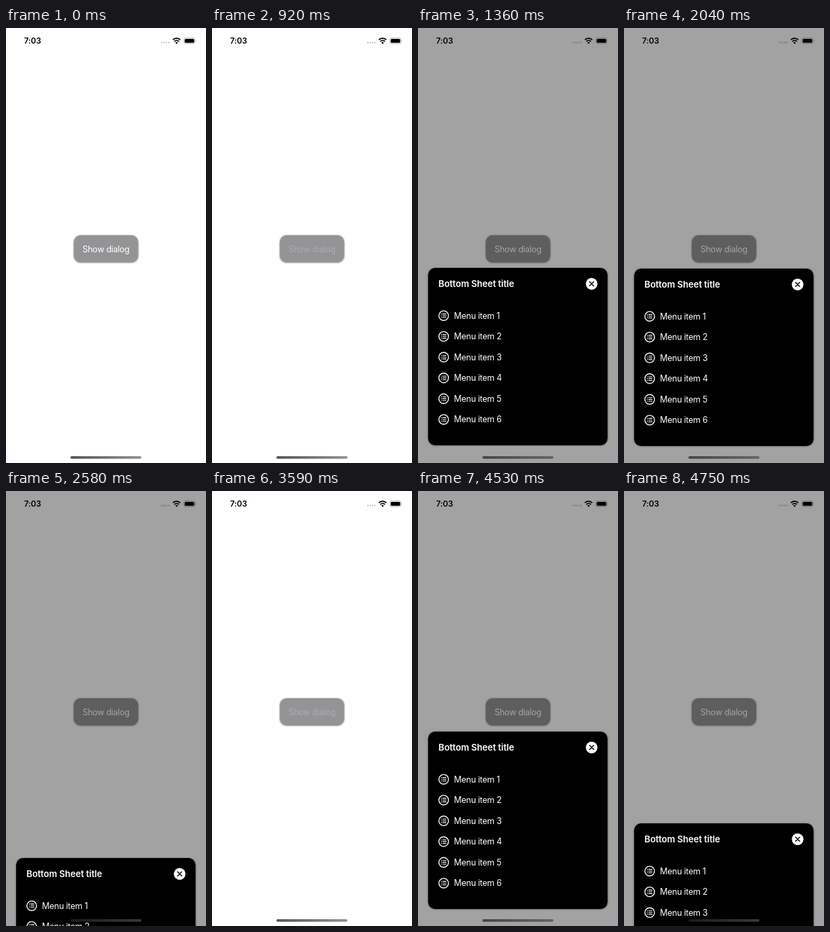
Write an HTML page that moves like this. It is 296 px wide and 640 px high and loops after 4810 ms.

```html
<!DOCTYPE html>
<html lang="en">
<head>
<meta charset="utf-8">
<title>Bottom sheet</title>
<style>
  html, body { margin: 0; width: 100%; height: 100%; overflow: hidden; background: #fff; }
  svg { display: block; width: 296px; height: 640px; }
  text { font-family: Inter, "Open Sans", sans-serif; font-size: 12.5px; letter-spacing: -.25px; }
  .white { fill: #fff; }
  .line { fill: none; stroke: #fff; stroke-width: 1.4; }
</style>
</head>
<body>
<svg viewBox="0 0 296 640">
  <defs>
    <linearGradient id="bar">
      <stop id="barA" offset="0"/>
      <stop id="barB" offset="1"/>
    </linearGradient>
    <filter id="glow" x="-10%" y="-20%" width="120%" height="140%">
      <feGaussianBlur stdDeviation="1.3"/>
    </filter>
    <g id="list">
      <circle class="line" r="7.1"/>
      <path class="line" style="stroke-width:1.1" d="M-1.8-2.6H4M-1.8 0H4M-1.8 2.6H4M-4-2.6h1.2M-4 0h1.2M-4 2.6h1.2"/>
    </g>
  </defs>

  <rect class="white" width="296" height="640"/>
  <rect x="100" y="305" width="96" height="40.5" rx="10" opacity=".4" filter="url(#glow)"/>
  <rect x="100.5" y="305" width="95" height="40" rx="10" fill="#949496"/>
  <text id="label" class="white" x="148" y="329.6" text-anchor="middle">Show dialog</text>
  <rect id="shade" width="296" height="640" opacity=".365"/>

  <g id="sheet">
    <rect x="14.5" width="266.5" height="261.5" rx="11" opacity=".4" filter="url(#glow)"/>
    <rect x="15" width="265.5" height="261" rx="10.5"/>
    <text class="white" x="30.3" y="27.9" style="font-size:13.2px;font-weight:600;letter-spacing:-.08px">Bottom Sheet title</text>
    <circle class="white" cx="257" cy="23.3" r="8.6"/>
    <path d="M254 20.3l6 6m0-6l-6 6" stroke="#000" stroke-width="1.5" stroke-linecap="round"/>
  </g>

  <text x="39.3" y="23" text-anchor="middle" style="font-size:11.8px;font-weight:600;letter-spacing:-.1px">7:03</text>
  <g id="dots" opacity=".25"></g>
  <g fill="none" stroke="#000" stroke-width="1.75">
    <path d="M247 17.4a8 8 0 0 1 11 0"/>
    <path d="M249.1 19.8a4.9 4.9 0 0 1 6.8 0"/>
  </g>
  <path d="M252.5 23.4l-1.9-1.9a2.7 2.7 0 0 1 3.8 0z"/>
  <rect x="263.2" y="14.6" width="16.6" height="8.4" rx="2.6" fill="none" stroke="#000" stroke-opacity=".35" stroke-width=".8"/>
  <rect x="264.5" y="15.9" width="14" height="5.8" rx="1.5"/>
  <path d="M280.8 17.4q1.3 1.4 0 2.8z" opacity=".4"/>
  <rect x="95.3" y="630" width="105.2" height="3.7" rx="1.85" fill="url(#bar)"/>
</svg>
<script>
const LOOP = 4810;
// Screen refresh times; the picture holds between them.
const TICKS = [0, 920, 1030, 1130, 1250, 1360, 2040, 2160, 2270, 2370, 2480, 2580,
  3590, 3700, 3810, 3920, 4040, 4530, 4640, 4750];
const REST = 353, BOTTOM = 640;
const CYCLES = [
  { press: 920, drag: 2040, dragTime: 540, dist: 186, end: 3590 },
  { press: 3590, drag: 4530, dragTime: 220, dist: 135, end: LOOP }
];

const $ = id => document.getElementById(id);
const clamp = v => Math.max(0, Math.min(1, v));

function add(parent, tag, attrs, text = "") {
  const el = document.createElementNS("http://www.w3.org/2000/svg", tag);
  for (const k in attrs) el.setAttribute(k, attrs[k]);
  el.textContent = text;
  parent.append(el);
}

for (let i = 0; i < 6; i++) {
  const y = 70.2 + i * 30.55;
  add($("sheet"), "use", { href: "#list", x: 38, y });
  add($("sheet"), "text", { class: "white", x: 53.2, y: y + 4.5 }, "Menu item " + (i + 1));
}
for (let i = 0; i < 4; i++) add($("dots"), "circle", { cx: 230.6 + i * 3.5, cy: 21.4, r: 1.1 });

function sheetTop(t, c) {
  if (t >= c.drag) return REST + 1 + c.dist * clamp((t - c.drag) / c.dragTime) ** 1.18;
  const u = clamp((t - c.press - 110) / 330);
  return BOTTOM + (REST - BOTTOM) * u ** 1.05;
}

function draw(time) {
  const t = TICKS.filter(k => k <= time).pop();
  const c = CYCLES.find(k => t >= k.press && t < k.end);
  const since = c ? t - c.press : 0;
  const dim = since >= 110;
  const top = c ? sheetTop(t, c) : BOTTOM;
  const shown = top < BOTTOM;

  $("label").setAttribute("opacity", c ? .22 + .78 * clamp((since - 110) / 200) : 1);
  $("shade").setAttribute("visibility", dim ? "visible" : "hidden");
  $("sheet").setAttribute("visibility", shown ? "visible" : "hidden");
  $("sheet").setAttribute("transform", `translate(0 ${top.toFixed(1)})`);

  const covered = shown && top + 261 > 634;
  const [a, b] = covered ? ["#1c1c1c", "#3a3a3a"] : dim ? ["#444", "#646464"] : ["#555", "#929292"];
  $("barA").setAttribute("stop-color", a);
  $("barB").setAttribute("stop-color", b);
}

const start = performance.now();
function frame() {
  draw((performance.now() - start) % LOOP);
  requestAnimationFrame(frame);
}
frame();
</script>
</body>
</html>
```
